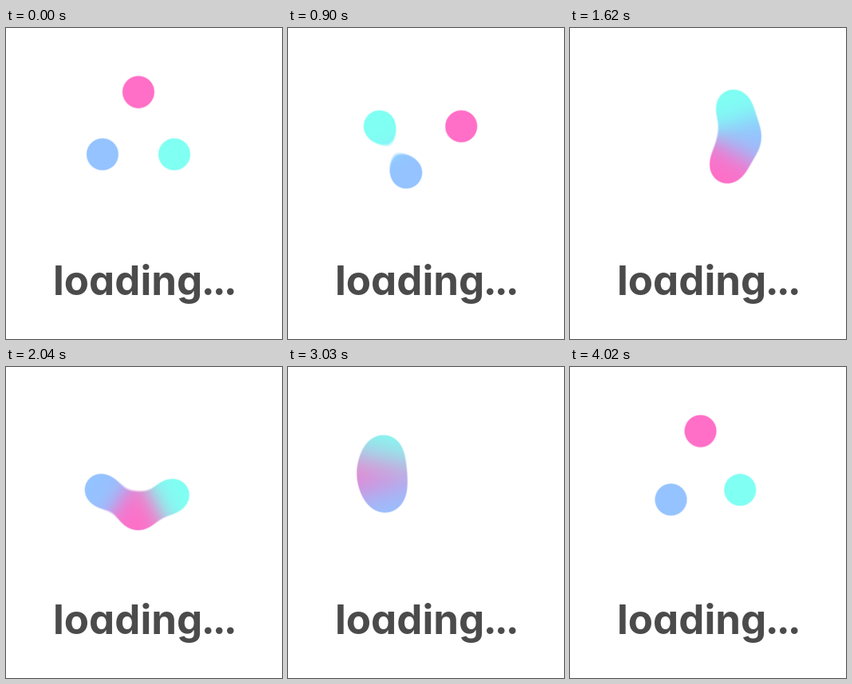
Write an HTML page with a canvas that moves like this. It is 346 px wide and 389 px high and loops after 4.05 s.

```html
<!DOCTYPE html>
<html lang="en">
<head>
<meta charset="utf-8">
<title>Loading</title>
<style>
  html, body { margin: 0; width: 100%; height: 100%; overflow: hidden; background: #fff; }
  body { position: relative; }
  canvas { position: absolute; left: 0; top: 0; }
  p {
    position: absolute; left: 59px; top: 286px; margin: 0; white-space: nowrap;
    font: 700 51px/60px Inter, "Open Sans", sans-serif;
    font-feature-settings: "cv11", "ss03";
    color: #4b4b4b;
  }
  .dots { margin-left: -1.5px; letter-spacing: -3px; }
</style>
</head>
<body>
<canvas width="346" height="260"></canvas>
<p>loading<span class="dots">...</span></p>
<script>
const LOOP = 4050, STEP = 30;
const CENTER = { x: 166, y: 132 }, ORBIT = 52, RADIUS = 20;
const REACH = 49, SPREAD = 400;

// start: degrees clockwise from the top; turns: revolutions per loop
const balls = [
  { start: 0, turns: 1, rgb: [255, 110, 199] },
  { start: 120, turns: 2, rgb: [128, 255, 243] },
  { start: 240, turns: 4, rgb: [148, 195, 255] }
];

const BOX = { x: 70, y: 36, w: 192, h: 192 };
const ctx = document.querySelector("canvas").getContext("2d");
const image = ctx.createImageData(BOX.w, BOX.h);

const gap = (a, b) => Math.hypot(a.x - b.x, a.y - b.y);

// Overlapping balls swell less than separate ones.
const reach = distance => Math.max(0.01, REACH * (1 - Math.exp(-distance / 11)));

function smoothMin(a, b, k) {
  const h = Math.max(k - Math.abs(a - b), 0);
  return Math.min(a, b) - h * h / (4 * k);
}

function place(ball, phase) {
  const angle = (ball.start / 360 + ball.turns * phase) * 2 * Math.PI;
  return {
    x: CENTER.x + ORBIT * Math.sin(angle),
    y: CENTER.y - ORBIT * Math.cos(angle),
    rgb: ball.rgb
  };
}

// Puts the closest pair first.
function closestFirst([a, b, c]) {
  return [[a, b, c], [b, c, a], [a, c, b]]
    .sort((p, q) => gap(p[0], p[1]) - gap(q[0], q[1]))[0];
}

function draw(time) {
  const phase = Math.floor((time % LOOP) / STEP) * STEP / LOOP;
  const [a, b, c] = closestFirst(balls.map(ball => place(ball, phase)));
  const pairReach = reach(gap(a, b));
  const thirdReach = reach(Math.min(gap(a, c), gap(b, c)));
  const data = image.data;
  let i = 0;

  for (let row = 0; row < BOX.h; row++) {
    for (let col = 0; col < BOX.w; col++, i += 4) {
      const p = { x: BOX.x + col + 0.5, y: BOX.y + row + 0.5 };
      const da = gap(p, a), db = gap(p, b), dc = gap(p, c);
      const pair = smoothMin(da - RADIUS, db - RADIUS, pairReach);
      const edge = smoothMin(pair, dc - RADIUS, thirdReach);
      const alpha = Math.min(1, Math.max(0, 0.5 - edge / 1.6));
      data[i + 3] = 255 * alpha;
      if (!alpha) continue;

      const weight = d => Math.exp(-d * d / (2 * SPREAD));
      const wa = weight(da), wb = weight(db), wc = weight(dc);
      for (let n = 0; n < 3; n++) {
        data[i + n] = (wa * a.rgb[n] + wb * b.rgb[n] + wc * c.rgb[n]) / (wa + wb + wc);
      }
    }
  }
  ctx.putImageData(image, BOX.x, BOX.y);
}

const begin = performance.now();
function tick() {
  draw(performance.now() - begin);
  requestAnimationFrame(tick);
}
tick();
</script>
</body>
</html>
```
